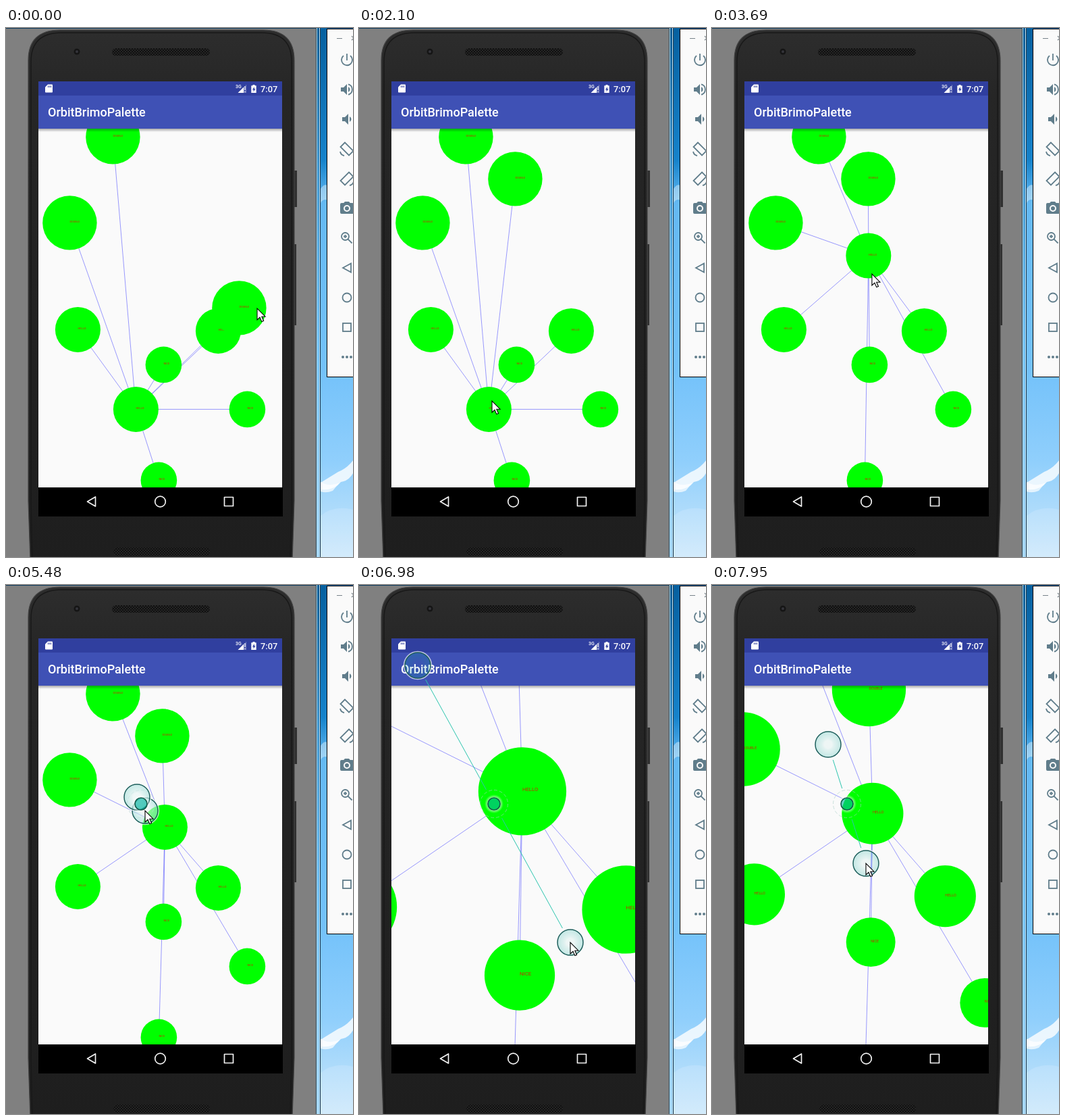
Animation, 514 px wide and 783 px high, one loop 8 s. Source, as an HTML page:

```html
<!DOCTYPE html>
<html lang="en">
<head>
<meta charset="utf-8">
<title>Node canvas</title>
<style>
html, body { margin: 0; width: 100%; height: 100%; overflow: hidden; background: #808080; }
svg { display: block; width: 514px; height: 783px; }
text { font-family: Roboto, "Open Sans", sans-serif; }
.link { stroke: #00f; stroke-width: .4; vector-effect: non-scaling-stroke; }
.node circle { fill: #0f0; }
.node text { font-size: 4px; fill: #e01000; fill-opacity: .85; }
.tool { fill: #607d8b; }
.tool .o { fill: none; stroke: #607d8b; stroke-width: 1.8; }
.nav { fill: none; stroke: #f2f2f2; stroke-width: 1.7; stroke-linejoin: round; }
.white { fill: #fff; }
</style>
</head>
<body>
<svg viewBox="0 0 514 783" xmlns="http://www.w3.org/2000/svg">
  <defs>
    <linearGradient id="sky" x2="0" y2="1">
      <stop offset="0" stop-color="#07609f"/>
      <stop offset=".25" stop-color="#1683cb"/>
      <stop offset=".33" stop-color="#64b9f3"/>
      <stop offset=".65" stop-color="#74c2fa"/>
      <stop offset=".82" stop-color="#90cffc"/>
      <stop offset="1" stop-color="#cbe7fa"/>
    </linearGradient>
    <linearGradient id="edge" x2="0" y2="1">
      <stop offset="0" stop-color="#0c5b94"/>
      <stop offset=".27" stop-color="#3c93cc"/>
      <stop offset=".6" stop-color="#6fc0f4"/>
      <stop offset="1" stop-color="#a4d6f6"/>
    </linearGradient>
    <linearGradient id="body" x2="0" y2="1">
      <stop offset="0" stop-color="#2d2d2d"/>
      <stop offset=".12" stop-color="#262626"/>
      <stop offset="1" stop-color="#1e1e1e"/>
    </linearGradient>
    <linearGradient id="shade" x2="0" y2="1">
      <stop offset="0" stop-color="#000" stop-opacity=".32"/>
      <stop offset="1" stop-color="#000" stop-opacity="0"/>
    </linearGradient>
    <radialGradient id="touch">
      <stop offset=".3" stop-color="#00a596" stop-opacity=".05"/>
      <stop offset=".45" stop-color="#00a596" stop-opacity=".1"/>
      <stop offset="1" stop-color="#00a596" stop-opacity=".22"/>
    </radialGradient>
    <radialGradient id="glow">
      <stop offset=".64" stop-color="#fff" stop-opacity="0"/>
      <stop offset=".65" stop-color="#fff" stop-opacity=".6"/>
      <stop offset="1" stop-color="#fff" stop-opacity="0"/>
    </radialGradient>
    <pattern id="mesh" width="4" height="4" patternUnits="userSpaceOnUse">
      <rect width="4" height="4" fill="#252525"/>
      <circle cx="1" cy="1" r="1" fill="#080808"/>
      <circle cx="3" cy="3" r="1" fill="#080808"/>
    </pattern>
    <clipPath id="view"><rect x="48" y="149" width="361" height="531"/></clipPath>
  </defs>

  <!-- desktop -->
  <rect x="466" width="48" height="783" fill="url(#sky)"/>
  <g fill="#fff">
    <path d="M466 238q5-8 10-5v22q-6-3-10 4z" opacity=".4"/>
    <path d="M514 640q-9 12-22 17-13 8-26 16v10q20 2 30-11 12-2 18-13z" opacity=".8"/>
    <path d="M466 672q14 8 28 1l-10 12q-10 4-18 1z" opacity=".7"/>
    <path d="M466 722q20-16 48-9v70h-48z" opacity=".15"/>
  </g>
  <rect width="459" height="783" fill="#808080"/>
  <rect width="466" height="1" fill="#0d3a5c"/>
  <rect x="459" width="1" height="783" fill="#2d4b5e"/>
  <rect x="460" width="1" height="783" fill="#b4dcee"/>
  <rect x="461" width="3" height="783" fill="url(#edge)"/>
  <rect x="464" width="1" height="783" fill="#c2e6f8"/>
  <rect x="465" width="1" height="783" fill="#123047"/>

  <!-- tool strip -->
  <rect x="475.5" y="1.5" width="60" height="515" fill="#fafafa" stroke="#000"/>
  <path d="M490 15.500h8M512 12l6 6M512 18l6-6" stroke="#78838a" stroke-width="1.200"/>
  <g id="tools"></g>

  <!-- phone -->
  <path d="M427 211h4v54h-4zM427 320h3v120h-3z" fill="#303030"/>
  <path d="M36 790L33 700V48Q33 3 80 3H381Q427 3 427 48V700L424 790Z" fill="url(#body)" stroke="#444" stroke-width="1.200"/>
  <path d="M39 790L37 700V50Q37 7 82 7H379Q423 7 423 50V700L421 790Z" fill="none" stroke="#191919" stroke-width="1.500"/>
  <circle cx="105" cy="35" r="4.500" fill="#151515"/>
  <circle cx="105" cy="35" r="2" fill="#35353a"/>
  <rect x="157" y="30" width="145" height="11" rx="5.500" fill="url(#mesh)"/>
  <rect x="159" y="769" width="143" height="12" rx="6" fill="url(#mesh)"/>

  <!-- screen -->
  <rect x="48" y="149" width="361" height="531" fill="#fafafa"/>
  <g clip-path="url(#view)"><g id="world"></g></g>
  <rect x="48" y="149" width="361" height="5" fill="url(#shade)"/>
  <rect x="48" y="79" width="361" height="21" fill="#303f9f"/>
  <rect x="48" y="100" width="361" height="49" fill="#3f51b5"/>
  <rect x="48" y="680" width="362" height="43"/>
  <path class="white" d="M62 83.500h6q1 0 1 1v10q0 1-1 1h-9q-1 0-1-1v-7z"/>
  <path d="M62.500 85.500v2.500M64.500 85.500v2.500M66.500 85.500v2.500" stroke="#303f9f"/>
  <path class="white" d="M355.500 84v12H343.500z"/>
  <path d="M353.800 84v12" stroke="#303f9f" stroke-width="3"/>
  <path d="M354 86v6M354 93.500v2" stroke="#fff" stroke-width="1.300"/>
  <text class="white" x="340" y="89" font-size="7" font-weight="500">3G</text>
  <path class="white" d="M365.500 84h3v1.300h2.200v10.700h-7.400V85.300h2.200z"/>
  <path d="M367.800 87l-2.800 4.500h1.700v3l2.700-4.500h-1.600z" fill="#303f9f"/>
  <text class="white" x="377" y="94.500" font-size="12.800" font-weight="500">7:07</text>
  <text class="white" x="62" y="131" font-size="18" font-weight="500">OrbitBrimoPalette</text>
  <g class="nav">
    <path d="M120.500 701l12-7v14z"/>
    <circle cx="228.500" cy="701" r="7.800"/>
    <rect x="323.500" y="694.500" width="13" height="13"/>
  </g>

  <g id="pinch">
    <g id="rods" stroke="#2cc5ae" stroke-width="1"></g>
    <circle cx="200" cy="324" r="20.500" fill="none" stroke="#a9cfc6" stroke-opacity=".6" stroke-dasharray="5 3"/>
    <g id="fingers"></g>
    <circle cx="200" cy="324" r="14" fill="url(#glow)"/>
    <circle cx="200" cy="324" r="9" fill="#00b4a0" fill-opacity=".6" stroke="#145c4c" stroke-width="1.700"/>
  </g>
  <path id="cursor" d="M0 0V17L4 13.300 6.800 19.600 9.600 18.400 6.800 12.200H12Z" fill="#fff" stroke="#000" stroke-width="1.100"/>
</svg>
<script>
const LOOP = 8000, REFRESH = 160;
const MID = [228.5, 414.5];   // zoom centre
const PIVOT = [200, 324];     // pinch centre
const RELEASE = 1520, PINCH = 5210, PRESS = 5940, WIDEST = 7310;
const $ = id => document.getElementById(id);

function add(parent, tag, attrs = {}, text = '') {
  const el = document.createElementNS('http://www.w3.org/2000/svg', tag);
  set(el, attrs);
  el.textContent = text;
  return parent.appendChild(el);
}
function set(el, attrs) {
  for (const k in attrs) el.setAttribute(k, attrs[k]);
}
const move = (el, [x, y]) => set(el, { transform: `translate(${x} ${y})` });
const show = (el, on) => { el.style.display = on ? '' : 'none'; };

// the screen refreshes at a fixed pace while something moves, else it rests
const BUSY = [[160, 2260], [2410, 3840], [4120, 4680], [5210, 5480], [5940, 7950]];
function lastRefresh(t) {
  const span = BUSY.filter(([from]) => from <= t).pop();
  if (!span) return 0;
  const [from, to] = span;
  return Math.max(from, to - Math.ceil(Math.max(0, to - t) / REFRESH) * REFRESH);
}

// straight hand strokes: each hop is [from, to, goal]
function stroke(begin, hops) {
  return t => hops.reduce((pos, [from, to, goal]) => {
    const f = Math.min(1, Math.max(0, (t - from) / (to - from)));
    return pos.map((v, i) => v + (goal[i] - v) * f);
  }, begin);
}
const leafAt = stroke([345, 414],
  [[160, 610, [177, 287]], [610, 1060, [365, 347]], [1060, RELEASE, [231, 223]]]);
const hubAt = stroke([192, 564], [[2260, 3570, [229, 322]], [3570, 3840, [235, 358]]]);
const hoverAt = stroke([258, 224],
  [[RELEASE, 1980, [197, 552]], [2260, 3400, [235, 350]], [3400, 3840, [238, 372]],
   [4120, 4680, [217, 337]], [4680, PINCH, PIVOT]]);
// finger x, y and zoom
const pinchAt = stroke([...PIVOT, 1],
  [[PINCH, 5480, [206, 334, 1]], [PRESS, 6350, [279, 454, 1.537]],
   [6350, WIDEST, [347, 604, 2.353]], [WIDEST, 7950, [228, 412, 1.36]]]);

function cursorAt(t) {
  if (t < RELEASE) {
    const [x, y] = leafAt(t);
    return [x + 27, y + 1];
  }
  if (t < PINCH) return hoverAt(t);
  return pinchAt(t > WIDEST ? t + 80 : t);   // runs ahead on the way back
}

// nodes: x, y, label; the radius follows the label length
const SPOTS = [[158, 161, 'DOUBLE'], [94, 288, 'DOUBLE'], [106, 446, 'HELLO'], [314, 448, 'HELLO'],
  [233, 498, 'NICE'], [357, 564, 'NICE'], [226, 669, 'NICE'], [...leafAt(0), 'DOUBLE'], [...hubAt(0), 'HELLO']];
const world = $('world');
const links = SPOTS.slice(0, -1).map(([x, y]) => add(world, 'line', { class: 'link', x2: x, y2: y }));
const nodes = SPOTS.map(([x, y, label]) => {
  const g = add(world, 'g', { class: 'node' });
  add(g, 'circle', { r: label.length * 6.7 });
  add(g, 'text', {}, label);
  move(g, [x, y]);
  return g;
});
const [leaf, hub] = nodes.slice(-2);
const leafLink = links[links.length - 1];

const SIDES = [1, -1];
const rods = SIDES.map(() => add($('rods'), 'line'));
const fingers = SIDES.map(() => {
  const g = add($('fingers'), 'g');
  add(g, 'circle', { r: 20.3, fill: 'none', stroke: '#fff', 'stroke-opacity': .65, 'stroke-width': 2 });
  add(g, 'circle', { class: 'idle', r: 19, fill: '#fff', 'fill-opacity': .55 });
  add(g, 'circle', { r: 19, fill: 'url(#touch)', stroke: '#1f5f5c', 'stroke-width': 1.5 });
  return g;
});

// tool strip icons on a 24-unit grid
const speaker = 'v6h4l5 5V4L';
const tilted = '<path class="o" d="M9 2.500L2.500 9 15 21.500 21.500 15z"/><path class="o" d="M2 16q1 5 6 6"/>';
const ICONS = [
  '<path class="o" d="M12 3v10M7 6A8 8 0 1 0 17 6"/>',
  `<path d="M3 9${speaker}7 9zM14 8q2.500 1.300 2.500 4T14 16z"/><path class="o" d="M14 4.300a8 8 0 0 1 0 15.400"/>`,
  `<path d="M5 9${speaker}9 9zM16 8q2.500 1.300 2.500 4T16 16z"/>`,
  tilted,
  `<g transform="matrix(-1 0 0 1 24 0)">${tilted}</g>`,
  '<path d="M9 2L7.200 4H4Q2 4 2 6V18Q2 20 4 20H20Q22 20 22 18V6Q22 4 20 4H16.800L15 2z"/><circle cx="12" cy="12" r="4" style="fill:#607d8b;stroke:#fafafa;stroke-width:2"/>',
  '<circle class="o" cx="9.500" cy="9.500" r="5.500"/><path class="o" d="M13.500 13.500l6 6M7 9.500h5M9.500 7v5"/>',
  '<path class="o" d="M6 12L18 5.500V18.500z"/>',
  '<circle class="o" cx="12" cy="12" r="6.500"/>',
  '<rect class="o" x="6" y="6" width="12" height="12"/>',
  '<circle cx="6" cy="12" r="2"/><circle cx="12" cy="12" r="2"/><circle cx="18" cy="12" r="2"/>'];
ICONS.forEach((icon, i) => {
  const g = add($('tools'), 'g', { class: 'tool' });
  g.innerHTML = icon;
  move(g, [493, 35 + i * 44]);
});

function drawPinch(t, [fx, fy]) {
  show($('pinch'), t >= PINCH);
  const [px, py] = PIVOT;
  const dx = fx - px, dy = fy - py;
  const near = 24 / (Math.hypot(dx, dy) || 1), far = 1 - near;
  SIDES.forEach((side, i) => {
    const along = f => [px + dx * side * f, py + dy * side * f];
    const [x1, y1] = along(near), [x2, y2] = along(far);
    move(fingers[i], along(1));
    show(fingers[i].querySelector('.idle'), t < PRESS);
    show(rods[i], far > near);
    set(rods[i], { x1, y1, x2, y2 });
  });
}

function draw(time) {
  const t = lastRefresh(time);
  const [lx, ly] = leafAt(t), [hx, hy] = hubAt(t), [fx, fy, zoom] = pinchAt(t);
  move(leaf, [lx, ly]);
  move(hub, [hx, hy]);
  set(leafLink, { x2: lx, y2: ly });
  links.forEach(l => set(l, { x1: hx, y1: hy }));
  set(world, { transform: `translate(${MID}) scale(${zoom}) translate(${.4 - MID[0]} ${.4 - MID[1]})` });
  move($('cursor'), cursorAt(t));
  drawPinch(t, [fx, fy]);
}

const start = performance.now();
function frame() {
  draw((performance.now() - start) % LOOP);
  requestAnimationFrame(frame);
}
frame();
</script>
</body>
</html>
```
